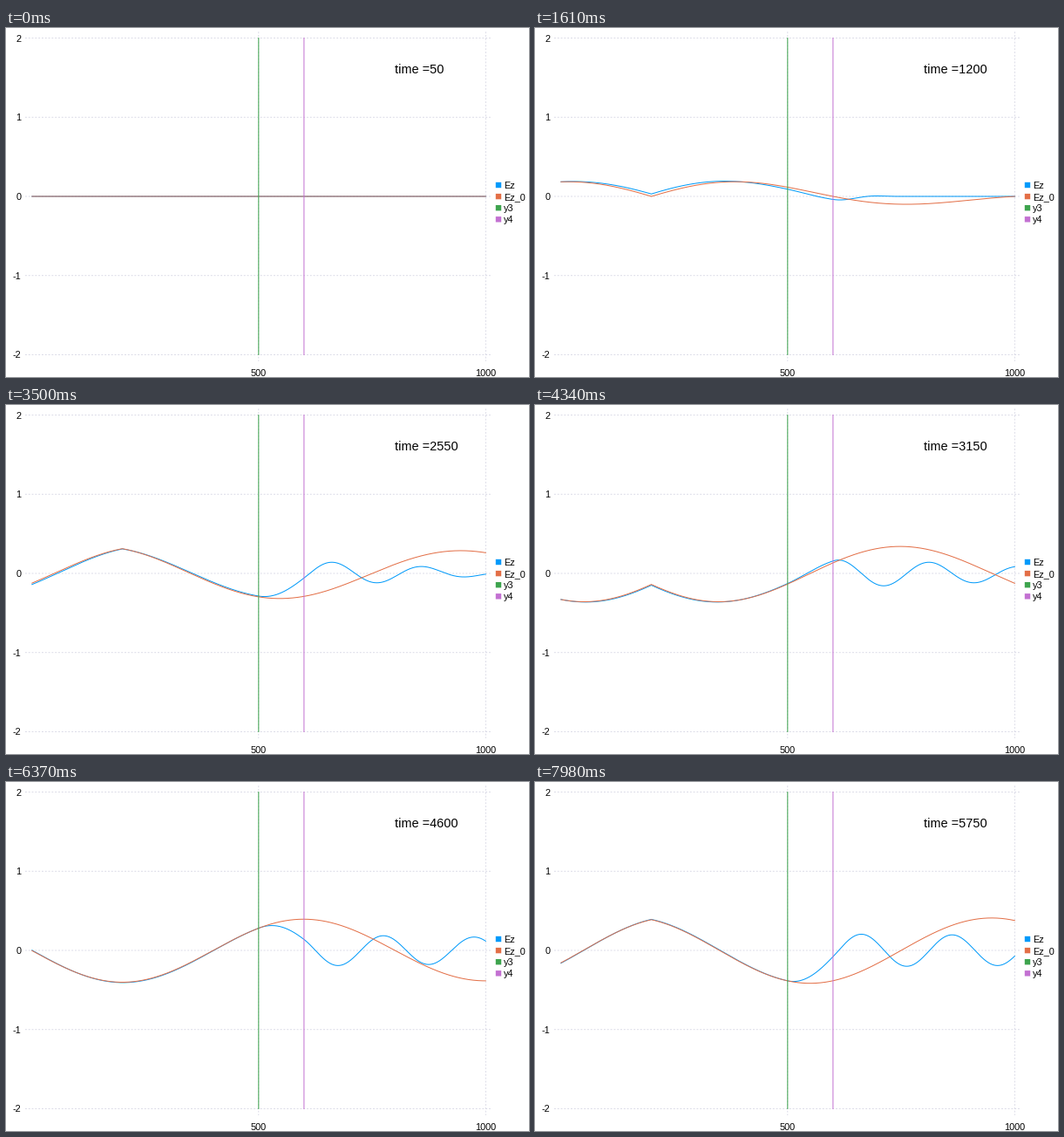
A matplotlib script for the animation above (8 s loop, 600 px wide and 400 px high).

```python
import numpy as np
import matplotlib.pyplot as plt
from matplotlib.animation import FuncAnimation
from matplotlib.patches import Rectangle

W, H, DPI = 600, 400, 100
PX = 72 / DPI                 # points per pixel
LOOP, TICK, HOLD = 8000, 20, 70

BLUE, ORANGE, GREEN, PURPLE = "#009afa", "#e36f47", "#3ea44e", "#c371d2"
GRID = "#d0d0e0"

plt.rcParams["font.family"] = "Liberation Sans"
fig = plt.figure(figsize=(W / DPI, H / DPI), dpi=DPI, facecolor="white")
ax = fig.add_axes([0, 0, 1, 1])
ax.set_xlim(0, W)
ax.set_ylim(H, 0)
ax.axis("off")


def sx(x):
    return 29.3 + 0.521 * x


def sy(v):
    return 193 - 90.75 * v


def label(x, y, s, size=10.9, ha="left"):
    return ax.text(x, y, s, fontsize=size * PX, ha=ha, va="baseline",
                   color="black", zorder=5)


def stroke(xs, ys, color, width=1.0, **kw):
    line, = ax.plot(xs, ys, color=color, lw=width * PX, snap=False, **kw)
    return line


# Wave: a ramped sine leaves SRC; cells 500 to 600 form a layer (n=2)
# in front of a dense medium (n=4)
SRC, IN, OUT = 200, 499.5, 600.5
PERIOD = 800
x = np.arange(1, 1001)


def source(t):
    return 0.5 * np.exp(-1000 / np.maximum(t, 1)) * np.sin(2 * np.pi * t / PERIOD)


def free_wave(t):
    return source(t - np.abs(x - SRC))


def echoes(t):
    """Signal plus its bounces inside the layer."""
    trip = 4 * (OUT - IN)
    return sum((-1 / 9) ** k * source(t - trip * k) for k in range(5))


def layered_wave(t):
    hit = t - (IN - SRC)
    through = hit - 2 * (OUT - IN)
    back = hit - (IN - x)
    left = (free_wave(t) - source(back) / 3
            - 8 / 27 * echoes(back - 4 * (OUT - IN)))
    inside = 2 / 3 * (echoes(hit - 2 * (x - IN))
                      - echoes(through - 2 * (OUT - x)) / 3)
    right = 4 / 9 * echoes(through - 4 * (x - OUT))
    return np.where(x < IN, left, np.where(x < OUT, inside, right))


# Grid and tick labels
dots = dict(linestyle=(0, (2.5, 2.5)), dash_capstyle="butt", zorder=1)
for v in range(-2, 3):
    stroke([22, 557.5], [sy(v)] * 2, GRID, 0.76, **dots)
    label(17.5, sy(v) + 4, str(v), ha="right")
for v in (500, 1000):
    stroke([sx(v)] * 2, [4.3, 382], GRID, 0.76, **dots)
    label(sx(v), 399, str(v), ha="center")

# Series
px = sx(x)
curve = stroke(px, sy(0 * x), BLUE, zorder=2)
curve0 = stroke(px, sy(0 * x), ORANGE, zorder=3)
for v, color in ((500, GREEN), (600, PURPLE)):
    stroke([sx(v)] * 2, [sy(2), sy(-2)], color, zorder=4)

# Legend
keys = (("Ez", BLUE), ("Ez_0", ORANGE), ("y3", GREEN), ("y4", PURPLE))
for i, (name, color) in enumerate(keys):
    cy = 180 + 13.1 * i
    ax.add_patch(Rectangle((561.8, cy - 3.2), 6.4, 6.4, fc=color, ec="none",
                           snap=False, zorder=4))
    label(571.4, cy + 4, name)

clock = label(sx(800), 52, "", size=14.5)


def draw(frame):
    step = (frame * TICK + TICK // 2) // HOLD
    t = 50 + 50 * step
    curve.set_ydata(sy(layered_wave(t)))
    curve0.set_ydata(sy(free_wave(t)))
    clock.set_text(f"time ={t}")
    return curve, curve0, clock


anim = FuncAnimation(fig, draw, frames=LOOP // TICK, interval=TICK,
                     repeat=True, repeat_delay=0, blit=False)
plt.show()
```
